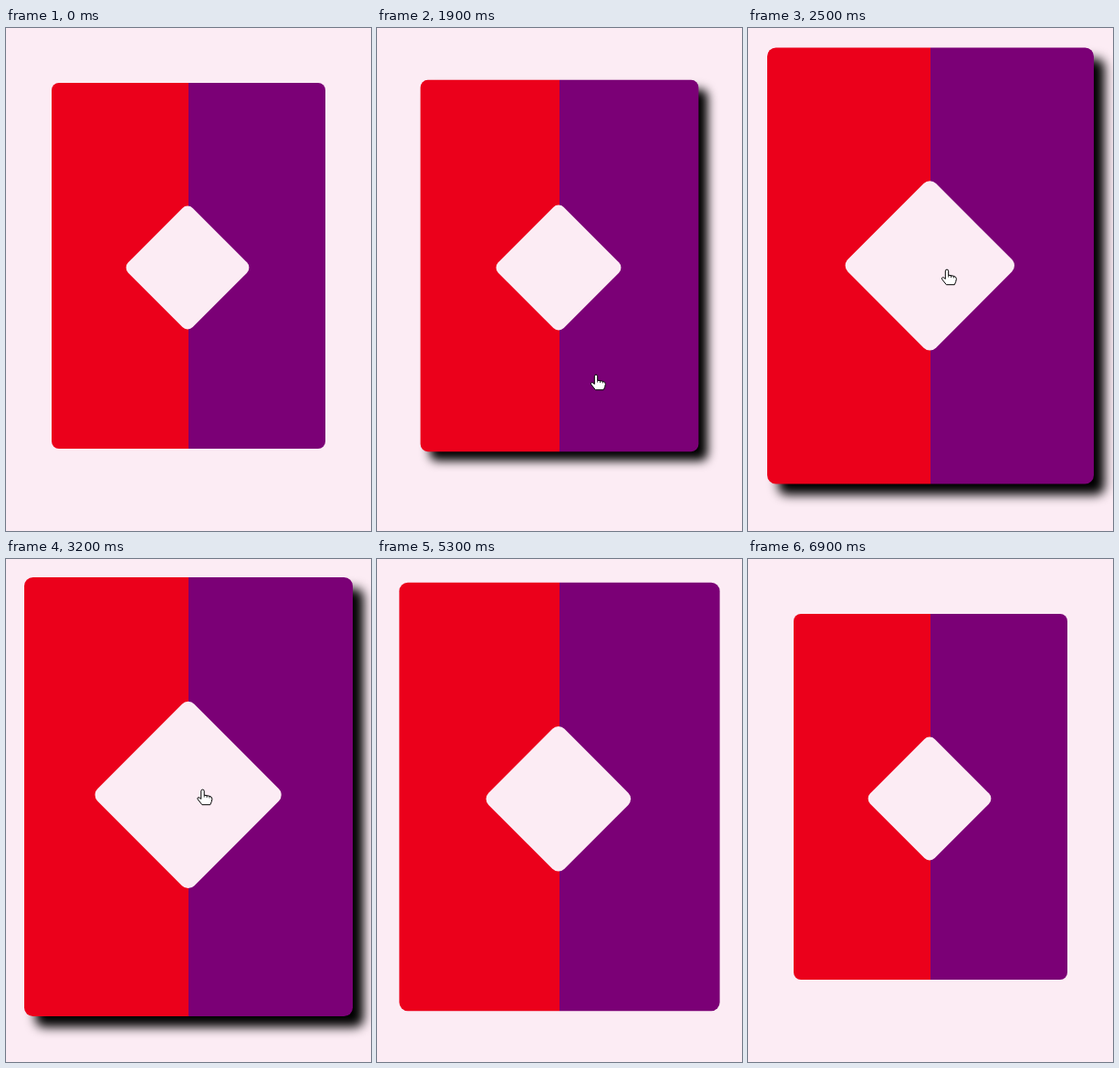
Write an HTML page that moves like this. It is 400 px wide and 550 px high and loops after 7.3 s.

```html
<!DOCTYPE html>
<html lang="en">
<head>
<meta charset="utf-8">
<title>Card hover</title>
<style>
  html, body { margin: 0; width: 100%; height: 100%; overflow: hidden; background: #fcecf4; }
  svg { display: block; width: 100vw; height: 100vh; }
</style>
</head>
<body>
<svg viewBox="0 0 400 550">
  <defs>
    <linearGradient id="halves">
      <stop offset=".5" stop-color="#eb001b"/>
      <stop offset=".5" stop-color="#7b0076"/>
    </linearGradient>
    <filter id="blur" x="-20%" y="-20%" width="140%" height="140%" color-interpolation-filters="sRGB">
      <feGaussianBlur stdDeviation="5"/>
    </filter>
  </defs>
  <g id="card">
    <rect id="shadow" x="-140" y="-190" width="300" height="400" rx="8" filter="url(#blur)"/>
    <rect x="-150" y="-200" width="300" height="400" rx="8" fill="url(#halves)"/>
    <rect id="diamond" rx="8" fill="#fcecf4"/>
  </g>
  <g id="hand" stroke="#000" stroke-linejoin="round">
    <path fill="#fff" d="M-1.7 1.8a1.7 1.7 0 0 1 3.4 0V6.2l5.5 1q3.2.6 3.2 3.2l-.7 3.1-1.4 3.2H-.6L-5.3 10.8q-1-1.8.8-2.1 1-.1 2.8 1.7z"/>
    <path fill="none" stroke-width=".8" d="M1.7 6v2.6M4.6 6.8v2.2M7.4 7.4v2"/>
  </g>
</svg>
<script>
const LOOP = 7300, STEP = 100;
const $ = id => document.getElementById(id);
const card = $('card'), shadow = $('shadow'), diamond = $('diamond'), hand = $('hand');

const cardHover = { on: 1820, off: 5170, inTime: 890, outTime: 1000 };
const diamondHover = { on: 2190, off: 4470, inTime: 920, outTime: 1000 };

// time, x and y of the fingertip
const path = [
  [1600, 262, 535], [1800, 250, 440], [1900, 240, 379], [2200, 229, 312],
  [2500, 218, 264], [3200, 215.5, 252], [4200, 215.5, 253], [4470, 220, 330],
  [4700, 222, 377], [5000, 226, 485], [5170, 228, 503]
];

const lerp = (a, b, k) => a + (b - a) * k;
const bez = (a, b, u) => 3 * a * u * (1 - u) ** 2 + 3 * b * u * u * (1 - u) + u ** 3;

// CSS "ease": cubic-bezier(.25, .1, .25, 1)
function ease(x) {
  if (x <= 0) return 0;
  if (x >= 1) return 1;
  let lo = 0, hi = 1;
  for (let i = 0; i < 24; i++) {
    const mid = (lo + hi) / 2;
    if (bez(.25, .25, mid) < x) lo = mid; else hi = mid;
  }
  return bez(.1, 1, lo);
}

const hover = (h, t) => t < h.off
  ? ease((t - h.on) / h.inTime)
  : 1 - ease((t - h.off) / h.outTime);

function moveHand(t) {
  const i = path.findIndex(p => p[0] > t);
  hand.style.display = i > 0 ? '' : 'none';
  if (i < 1) return;
  const [t0, x0, y0] = path[i - 1], [t1, x1, y1] = path[i];
  const k = (t - t0) / (t1 - t0);
  hand.setAttribute('transform', `translate(${lerp(x0, x1, k)} ${lerp(y0, y1, k)})`);
}

function draw(t) {
  card.setAttribute('transform', `translate(200 260) scale(${1 + .2 * hover(cardHover, t)})`);
  shadow.style.display = t >= cardHover.on && t < cardHover.off ? '' : 'none';

  const k = hover(diamondHover, t), size = lerp(100, 125, k);
  for (const a of ['width', 'height']) diamond.setAttribute(a, size);
  for (const a of ['x', 'y']) diamond.setAttribute(a, -size / 2);
  diamond.setAttribute('transform', `translate(${lerp(-1, -.3, k)} ${lerp(2, -1.7, k)}) rotate(45)`);

  moveHand(t);
}

const start = performance.now();
function tick() {
  const t = (performance.now() - start) % LOOP;
  draw(Math.floor(t / STEP) * STEP);
  requestAnimationFrame(tick);
}
tick();
</script>
</body>
</html>
```
